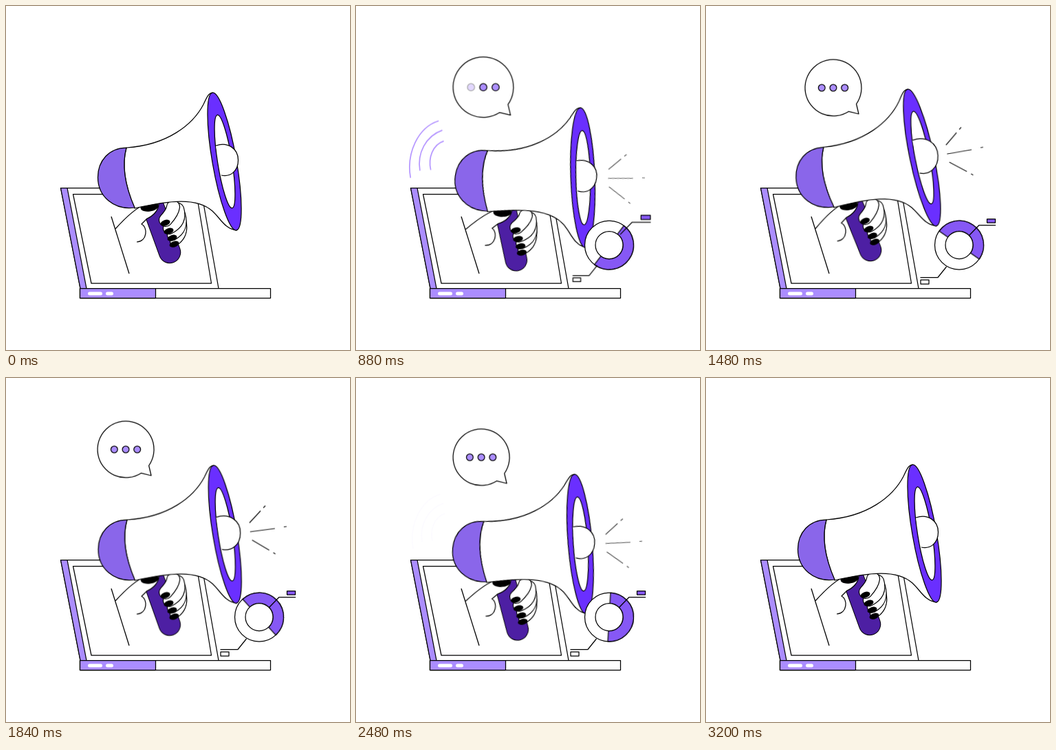
Write an HTML page that moves like this. It is 500 px wide and 500 px high and loops after 3.24 s.

```html
<!DOCTYPE html>
<html lang="en">
<head>
<meta charset="utf-8">
<title>Megaphone</title>
<style>
html, body { margin: 0; width: 100%; height: 100%; overflow: hidden; background: #fff; }
svg { display: block; width: 100%; height: 100%; }
svg * { animation: 3.24s cubic-bezier(.37, 0, .63, 1) infinite; }
.ink { fill: #fff; stroke: #000; stroke-width: 1.25; stroke-linejoin: round; }
.line { fill: none; }
.lilac { fill: #ab8dff; }
.violet { fill: #8658f5; }
#bubble *, #donut *, .label *, #ball { vector-effect: non-scaling-stroke; }

#scene { animation-name: hop; }
@keyframes hop {
  0%, 4%, 22%, 100% { transform: none; }
  13.58% { transform: translateY(-19px); }
}

/* Everything held by the hand turns about the wrist */
#swing { transform-origin: 153px 326px; animation-name: swing; }
@keyframes swing {
  0%, 97.6%, 100% { transform: rotate(0deg); }
  13.6%, 85.2% { transform: rotate(-9.3deg); }
  26.8% { transform: rotate(7.9deg); }
  40.1% { transform: rotate(-9deg); }
  52.5% { transform: rotate(7.5deg); }
  62% { transform: rotate(-9deg); }
  73.5% { transform: rotate(7.9deg); }
}

#ball { transform-origin: 309px 225px; animation-name: ball; }
@keyframes ball {
  0%, 26.8%, 52.5%, 73.5%, 97.6%, 100% { transform: scale(1); }
  13.6%, 40.1%, 62%, 85.2% { transform: scale(1.2); }
}

#rays { animation-name: rays; }
@keyframes rays {
  0%, 8% { opacity: 0; }
  13.6% { opacity: .3; }
  27% { opacity: .6; }
  45.7% { opacity: .9; }
  68% { opacity: 1; }
  85.2% { opacity: .35; }
  92%, 100% { opacity: 0; }
}

.finger { transform-origin: var(--knuckle); animation-name: tap; }
@keyframes tap {
  0%, 6%, 20%, 62%, 75%, 100% { transform: rotate(0deg); }
  13.6%, 67.9% { transform: rotate(var(--lift)); }
}

#donut, .label { transform-origin: 368px 347.5px; }
#donut { animation-name: donut; }
@keyframes donut {
  0%, 5% { transform: scale(0); }
  13.2% { transform: scale(1.22); }
  21% { transform: scale(.97); }
  27%, 90% { transform: scale(1); }
  97%, 100% { transform: scale(0); }
}
#half { transform-origin: 368px 347.5px; animation-name: half; }
@keyframes half {
  0% { transform: rotate(-130deg); }
  13.6%, 15% { transform: rotate(-46deg); }
  26%, 35% { transform: rotate(37deg); }
  45%, 54% { transform: rotate(-55deg); }
  66%, 71% { transform: rotate(40deg); }
  84%, 100% { transform: rotate(-55deg); }
}
#right { animation-name: right; }
@keyframes right {
  0%, 19% { transform: scale(0); }
  27% { transform: scale(1.14); }
  34%, 88% { transform: scale(1); }
  95%, 100% { transform: scale(0); }
}
#left { animation-name: left; }
@keyframes left {
  0%, 20% { transform: scale(0); }
  27% { transform: scale(.94); }
  31% { transform: scale(1.1); }
  37%, 88% { transform: scale(1); }
  95%, 100% { transform: scale(0); }
}

#bob { animation-name: bob; }
@keyframes bob {
  0%, 9% { transform: translate(4px, 18px); }
  13.6% { transform: translate(3px, 13px); }
  22%, 27.2% { transform: translate(0, -1px); }
  36.5%, 60.5% { transform: translate(-13px, -18px); }
  46.3%, 72.8% { transform: translate(0, 0); }
  84.8% { transform: translate(-13px, -17px); }
  97%, 100% { transform: translate(-8px, -10px); }
}
#bubble { transform-origin: 185px 119px; animation-name: bubble; }
@keyframes bubble {
  0%, 8% { transform: rotate(-40deg) scale(0); }
  13.6% { transform: rotate(-26deg) scale(.75); }
  25%, 27.5% { transform: rotate(0deg) scale(1.07); }
  33%, 89% { transform: rotate(0deg) scale(1); }
  96%, 100% { transform: rotate(-20deg) scale(0); }
}
.dot { animation-name: dot; animation-fill-mode: backwards; }
@keyframes dot {
  0%, 15% { opacity: 0; }
  19%, 23.5% { opacity: 1; }
  27.2% { opacity: .35; }
  31%, 100% { opacity: 1; }
}

#waves { fill: none; stroke: #a27bff; stroke-width: 1.6; transform-origin: 140px 220px; animation-name: waves; }
@keyframes waves {
  0%, 20% { opacity: 0; transform: none; }
  23% { opacity: 1; transform: translate(-4px, -3px); }
  27.2% { opacity: .8; transform: translate(-12.5px, -8px) scale(1.05); }
  32% { opacity: 0; transform: translate(-16px, -10px) scale(1.07); }
  64% { opacity: 0; transform: translate(4px, 3px); }
  67.9% { opacity: 1; transform: none; }
  74% { opacity: .6; transform: translate(-9px, -6px); }
  77%, 100% { opacity: 0; transform: translate(-11px, -8px); }
}

#curl { fill: none; stroke: #8658f5; stroke-width: 2.2; stroke-dasharray: 1 1.5; animation-name: curl; }
@keyframes curl {
  0%, 7% { stroke-dashoffset: 1; transform: translateY(5px); }
  12.5% { stroke-dashoffset: 0; transform: translateY(0); }
  15% { stroke-dashoffset: 0; transform: translateY(-1px); }
  22% { stroke-dashoffset: -1; transform: translateY(-2px); }
  22.01%, 77% { stroke-dashoffset: 1; transform: translate(-7px, 20px); }
  85.2% { stroke-dashoffset: .34; transform: translate(-5px, 14.5px); }
  90% { stroke-dashoffset: 0; transform: translate(-4px, 10px); }
  96%, 100% { stroke-dashoffset: -1; transform: translate(-3px, 7px); }
}
</style>
</head>
<body>
<svg viewBox="0 0 500 500">
  <g id="waves">
    <path d="M133 177C104 186 88 222 94 256"/>
    <path d="M138 190C115 198 103 222 107 246"/>
    <path d="M140 205C125 210 118 228 122 245"/>
  </g>

  <path id="curl" pathLength="1" d="M291 42C300 31 323 33 324 51C324 64 309 66 308 57C308 46 342 44 341.5 83"/>

  <g id="bob">
    <g id="bubble" class="ink">
      <path d="M218.6 142.5L222 157L207.3 153.4A41 41 0 1 1 218.6 142.5Z"/>
      <circle class="dot lilac" cx="168.3" cy="119" r="4.9"/>
      <circle class="dot lilac" cx="185" cy="119" r="4.9" style="animation-delay:.14s"/>
      <circle class="dot lilac" cx="201.7" cy="119" r="4.9" style="animation-delay:.28s"/>
    </g>
  </g>

  <g id="scene" class="ink">
    <g id="laptop">
      <path d="M79.5 264.5H283L309 410.5H108Z"/>
      <path class="lilac" d="M79.5 264.5H89L117 410.5H108Z"/>
      <path d="M97.5 273.5H277L298.5 403H124Z"/>
      <path d="M107.5 410.5H384.5V424.5H107.5Z"/>
      <path class="lilac" d="M107.5 410.5H217.5V424.5H107.5Z"/>
      <g stroke="none">
        <rect x="119" y="415.5" width="21" height="5" rx="2.5"/>
        <rect x="145" y="415.5" width="11" height="5" rx="2.5"/>
      </g>
    </g>
    <path class="line" d="M153 306L179 389"/>

    <g id="swing">
      <g stroke-linecap="round">
        <path class="line" stroke-width="32.5" d="M214 292L238 358"/>
        <path class="line" stroke="#4d1fa3" stroke-width="30.5" d="M214 292L238 358"/>
      </g>
      <g id="fingers"></g>
      <path d="M159 324C175 306 190 293 204 287L222 287C222 297 214 305 205 309C198 312 193 315 198 319C205 325 204 341 190 343" stroke="none"/>
      <path class="line" d="M159 324C175 306 190 293 204 287M222 287C222 297 214 305 205 309L197 317C206 321 206 342 190 343"/>
      <ellipse cx="208.5" cy="292" rx="12.5" ry="6" transform="rotate(-8 208.5 292)" fill="#000"/>

      <path d="M175 206C235 202 272 172 287 143C292 132 295 126 300 126L335 326C318 324 312 309 300 298C278 278 238 282 187 294C176 268 167 235 175 206Z"/>
      <path fill="#8a66ea" d="M175 206C150 206 133.5 225 133.5 249C133.5 277 157 297 187 293C176 268 167 235 175 206Z"/>
      <ellipse cx="317.5" cy="226" rx="17.5" ry="101.5" transform="rotate(-9.9 317.5 226)" fill="#6a2fff"/>
      <ellipse cx="318" cy="226" rx="10.5" ry="68.5" transform="rotate(-9 318 226)"/>
      <path id="ball" d="M305 203C322 197 337.5 207 337.5 224C337.5 240 326 249 313 246"/>
      <g id="rays" class="line">
        <path d="M353 209L369 191.5M373 187L376 184"/>
        <path d="M354 222L390 217M403 214.5L407 214"/>
        <path d="M357 234L382 248.5M388 252L391 254"/>
      </g>
    </g>

    <g id="donut">
      <circle cx="368" cy="347.5" r="35.5"/>
      <path id="half" class="violet" d="M368 312a35.5 35.5 0 0 1 0 71v-15.5a20 20 0 0 0 0-40Z"/>
      <circle cx="368" cy="347.5" r="20"/>
    </g>
    <g id="right" class="label">
      <path class="line" d="M382 334L397 318.5H421"/>
      <rect class="violet" x="408.5" y="309.5" width="12" height="5.5"/>
    </g>
    <g id="left" class="label">
      <path class="line" d="M349.5 379L337 394.5H311.5"/>
      <rect x="312" y="398" width="12" height="6"/>
    </g>
  </g>
</svg>
<script>
// Lowest finger first: knuckle, bend, tip, width, lift in degrees
const fingers = [
  [255, 311, 260, 332, 245, 342, 13, -4],
  [253, 303, 259, 324, 242, 333, 15, -13],
  [250, 295, 256, 314, 237, 323, 17, -22],
  [243, 292, 242, 300, 232, 311, 19, -4]
];

document.getElementById("fingers").innerHTML = fingers.map(([x, y, bx, by, tx, ty, w, lift]) => {
  const d = `M${x} ${y}Q${bx} ${by} ${tx} ${ty}`;
  const stroke = (color, width) =>
    `<path d="${d}" fill="none" stroke="${color}" stroke-width="${width}" stroke-linecap="round"/>`;
  const nail = `<ellipse cx="${tx - .5}" cy="${ty + 4}" rx="7.2" ry="4.2"
    transform="rotate(-18 ${tx} ${ty + 4})" fill="#000" stroke="none"/>`;
  return `<g class="finger" style="--knuckle:${x}px ${y}px;--lift:${lift}deg">
    ${stroke("#000", w + 1.2)}${stroke("#fff", w - 1.2)}${nail}</g>`;
}).join("");
</script>
</body>
</html>
```
